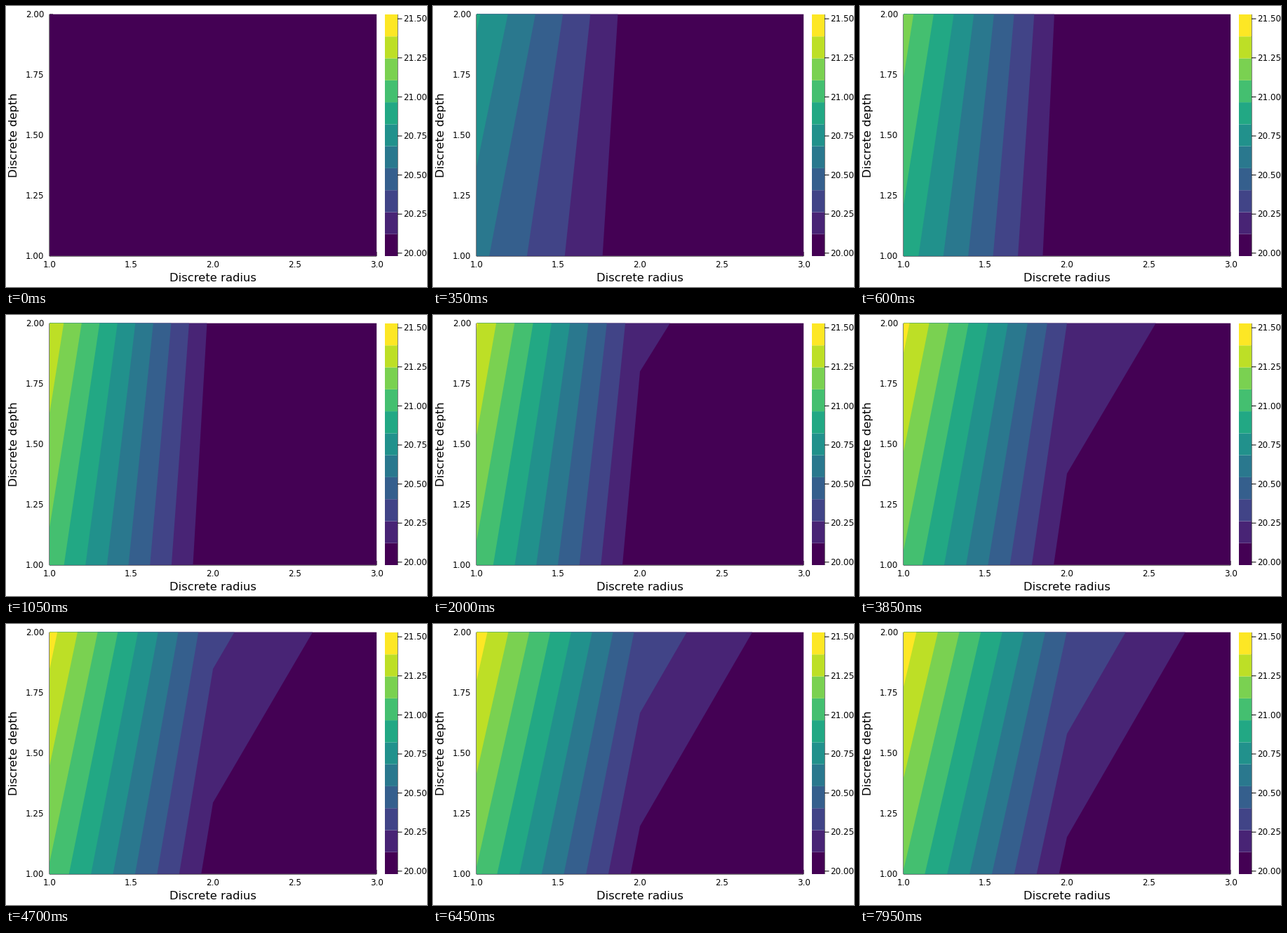
Recreate the animation shown at these times as a matplotlib script. Size 600 px wide and 400 px high, loop 8000 ms.

```python
import numpy as np
import matplotlib.pyplot as plt
from matplotlib.animation import FuncAnimation
from matplotlib.patches import Polygon, Rectangle

W, H, DPI = 600, 400, 100
FRAMES, INTERVAL = 160, 50
LEFT, MID, RIGHT = 62.2, 295.0, 528.2
TOP, BOTTOM = 11.7, 355.7
BANDS = 11
TICK_PX, LABEL_PX = 11.9, 16.4

plt.rcParams["font.family"] = "DejaVu Sans"
viridis = plt.get_cmap("viridis")
colors = [viridis(k / (BANDS - 1)) for k in range(BANDS)]

fig = plt.figure(figsize=(W / DPI, H / DPI), dpi=DPI, facecolor="white")
ax = fig.add_axes([0, 0, 1, 1])
ax.set_xlim(0, W)
ax.set_ylim(H, 0)
ax.axis("off")


def line(x0, y0, x1, y1):
    ax.plot([x0, x1], [y0, y1], color="black", lw=0.72, zorder=1,
            solid_capstyle="butt", snap=False)


def label(x, y, text, px, ha="center", rotation=0):
    ax.text(x, y, text, fontsize=px * 72 / DPI, ha=ha, va="baseline",
            rotation=rotation, rotation_mode="anchor", color="black")


def box(x0, y0, x1, y1, color):
    ax.add_patch(Rectangle((x0, y0), x1 - x0, y1 - y0, facecolor=color,
                           lw=0, snap=False, zorder=2))


def draw_static():
    # axes, mostly hidden below the fill
    line(62, 12, 62, 356)
    line(62, 356, 528, 356)
    line(528, 350, 528, 356)
    line(62, 12, 67, 12)
    box(LEFT, TOP, RIGHT, BOTTOM, colors[0])

    for i in range(5):
        label(62 + 116.5 * i, 371.8, f"{1 + 0.5 * i:.1f}", TICK_PX)
        label(54.3, 360.3 - 86 * i, f"{1 + 0.25 * i:.2f}", TICK_PX, "right")
    label(295, 392, "Discrete radius", LABEL_PX)
    label(16, 184, "Discrete depth", LABEL_PX, rotation=90)

    # colour bar
    step = 344 / BANDS
    for k, color in enumerate(colors):
        box(540, 356 - step * (k + 1), 558, 356 - step * k, color)
    line(558, 12, 558, 356)
    for i in range(7):
        y = 351.8 - 55.6 * i
        line(558, y, 564.5, y)
        label(566, y + 4.3, f"{20 + 0.25 * i:.2f}", TICK_PX, "left")


def rise(n, a, b):
    return 1 - np.exp(-a * n - b * n * n)


def node_values(n):
    """Heat at the grid nodes, counted in contour steps above the start."""
    d = 3.75 * (1 - np.exp(-max(n - 1.7, 0) / 99))
    c = 9.7 * rise(n, 0.105, 0.0051) + 0.3 * d
    a = 7.65 * rise(n, 0.0571, 0.00878) + 0.1 * d
    b = 0.217 * d * (1 - np.exp(-n / 32))
    return a, b, 0.08 * d, d, c


NODES = np.array([(LEFT, BOTTOM), (MID, BOTTOM), (RIGHT, TOP),
                  (MID, TOP), (LEFT, TOP)])


def hot_region(values, level):
    """Outline of the area at or above a level, linear along cell edges."""
    def cross(i, j):
        t = (level - values[i]) / (values[j] - values[i])
        return NODES[i] + t * (NODES[j] - NODES[i])

    above = [v >= level for v in values]
    points = []
    for i in range(5):
        j = (i + 1) % 5
        if above[i]:
            points.append(NODES[i])
        if above[i] != above[j]:
            points.append(cross(i, j))
        if i == 0 and above[3] and not above[1]:
            points.append(cross(1, 3))
    return points


draw_static()
layers = []
for k in range(1, BANDS):
    layer = Polygon([(0, 0), (1, 0), (0, 1)], facecolor=colors[k], lw=0,
                    snap=False, visible=False, zorder=2 + k / 20)
    layers.append(ax.add_patch(layer))


def update(n):
    values = node_values(n)
    for k, layer in enumerate(layers, 1):
        points = hot_region(values, k)
        layer.set_visible(len(points) > 2)
        if len(points) > 2:
            layer.set_xy(points)
    return layers


anim = FuncAnimation(fig, update, frames=FRAMES, interval=INTERVAL,
                     init_func=lambda: update(0), repeat=True,
                     repeat_delay=0, blit=False)
plt.show()
```
